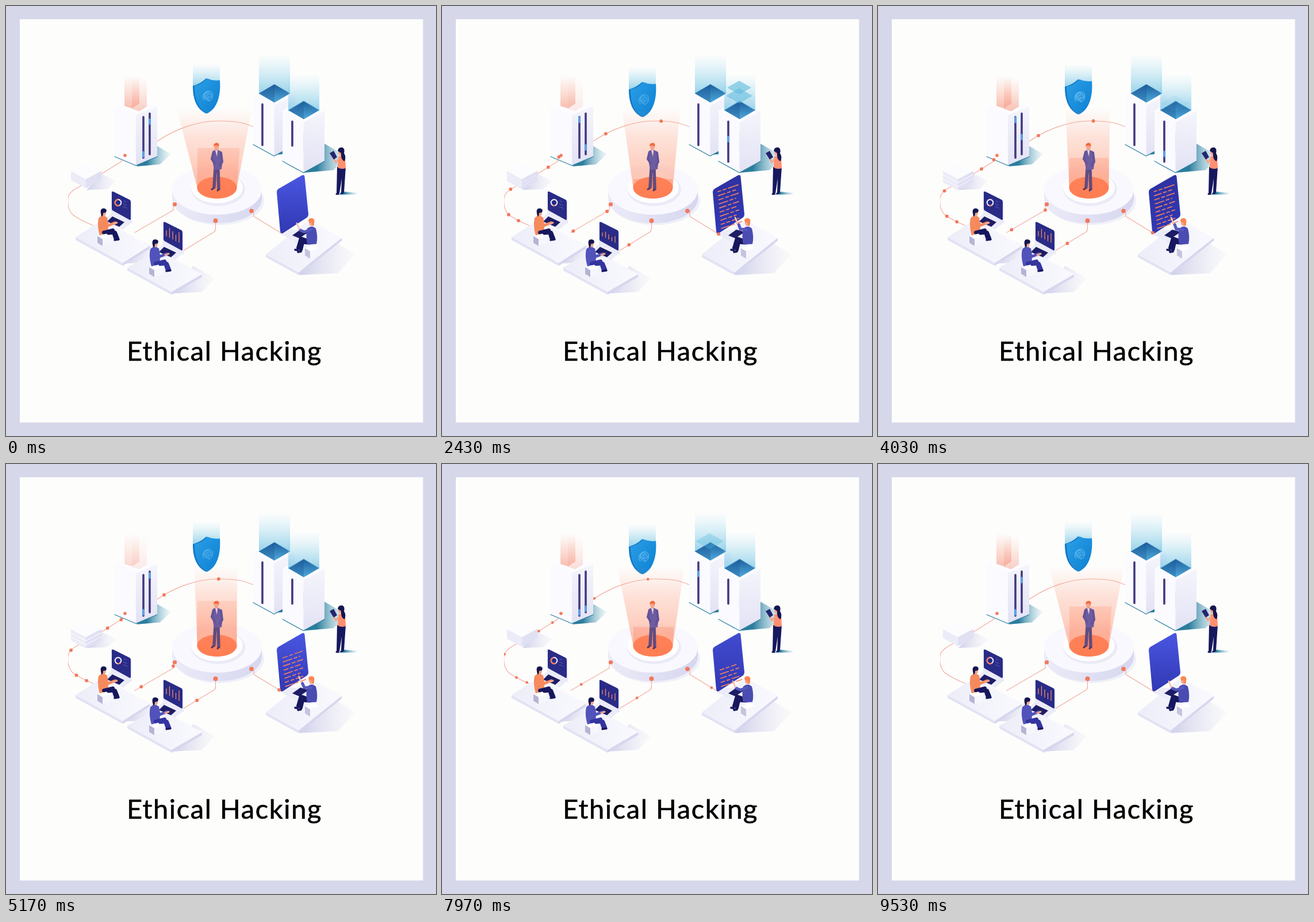
Recreate the animation shown at these times as an HTML page. Size 748 by 748 pixels, loop 9560 ms.

```html
<!DOCTYPE html>
<html lang="en">
<head>
<meta charset="utf-8">
<title>Ethical Hacking</title>
<style>
html, body { margin: 0; width: 100%; height: 100%; overflow: hidden; background: #d6d7e9; }
svg { display: block; width: 100%; height: 100%; }
.title { font: 400 47px Lato, "Open Sans", sans-serif; letter-spacing: 1.6px; stroke: #000; stroke-width: .6; stroke-linejoin: round; }
.limb { fill: none; stroke-linecap: round; stroke-linejoin: round; }
</style>
</head>
<body>
<svg viewBox="0 0 748 748">
  <defs>
    <linearGradient id="coneFill" gradientUnits="userSpaceOnUse" x1="0" y1="178" x2="0" y2="322">
      <stop offset="0" stop-color="#ff9d80" stop-opacity="0"/>
      <stop offset=".35" stop-color="#ff9474" stop-opacity=".26"/>
      <stop offset="1" stop-color="#ff8058" stop-opacity=".52"/>
    </linearGradient>
    <linearGradient id="salmon" x2="0" y2="1">
      <stop stop-color="#f9a08a" stop-opacity="0"/><stop offset="1" stop-color="#f58f74" stop-opacity=".6"/>
    </linearGradient>
    <linearGradient id="sky" x2="0" y2="1">
      <stop stop-color="#9fdcf0" stop-opacity="0"/><stop offset="1" stop-color="#6cc0e2" stop-opacity=".7"/>
    </linearGradient>
    <linearGradient id="shieldFill" x2="1" y2="1">
      <stop stop-color="#2a9fe6"/><stop offset="1" stop-color="#0d7fd2"/>
    </linearGradient>
    <linearGradient id="pit" x2="0" y2="1">
      <stop stop-color="#1c5f9e"/><stop offset="1" stop-color="#4fa9da"/>
    </linearGradient>
    <linearGradient id="side" x2="0" y2="1">
      <stop stop-color="#f5f5fc"/><stop offset="1" stop-color="#e2e2f4"/>
    </linearGradient>
    <linearGradient id="teal">
      <stop offset=".3" stop-color="#2b7d9c"/><stop offset="1" stop-color="#a9d4e2" stop-opacity=".15"/>
    </linearGradient>
    <linearGradient id="shade">
      <stop stop-color="#cfcfea"/><stop offset="1" stop-color="#e9e9f6" stop-opacity=".2"/>
    </linearGradient>
    <linearGradient id="rim">
      <stop stop-color="#ebebf8"/><stop offset="1" stop-color="#d6d6ef"/>
    </linearGradient>
    <linearGradient id="slab">
      <stop stop-color="#ededf9"/><stop offset="1" stop-color="#f9f9fe"/>
    </linearGradient>
    <linearGradient id="glass" x2="0" y2="1">
      <stop id="glassTop"/><stop offset="1" stop-color="#3138b2"/>
    </linearGradient>
    <clipPath id="stage"><rect x="108" y="80" width="506" height="430"/></clipPath>
  </defs>
  <rect width="748" height="748" fill="#d6d7e9"/>
  <rect x="24" y="23" width="701.5" height="701.5" fill="#fdfdfc"/>
  <g id="scene" clip-path="url(#stage)"></g>
  <text class="title" x="380" y="617" text-anchor="middle">Ethical Hacking</text>
</svg>
<script>
const LOOP = 9560, TAU = 2 * Math.PI;
const NAVY = '#17175e', HAIR = '#15154f', CORAL = '#f2785c', SKIN = '#f3a58c';
const $ = id => document.getElementById(id);
const clamp = v => Math.min(1, Math.max(0, v));
const ramp = (t, a, b) => clamp((t - a) / (b - a));
const ease = u => u * u * (3 - 2 * u);
// Rises from a to b, holds, falls from c to d.
const pulse = (t, a, b, c, d) => ease(ramp(t, a, b)) * (1 - ease(ramp(t, c, d)));
// Cosine with n whole turns per loop.
const wave = (t, n, shift = 0) => Math.cos(TAU * (n * t / LOOP - shift));
const times = (n, f) => Array.from({ length: n }, (_, i) => f(i));

const poly = (pts, fill, extra = '') => `<polygon points="${pts}" fill="${fill}" ${extra}/>`;
const path = (d, fill, extra = '') => `<path d="${d}" fill="${fill}" ${extra}/>`;
const limb = (d, color, w, extra = '') => `<path class="limb" d="${d}" stroke="${color}" stroke-width="${w}" ${extra}/>`;
const disc = (x, y, rx, fill, ry = rx) => `<ellipse cx="${x}" cy="${y}" rx="${rx}" ry="${ry}" fill="${fill}"/>`;
const group = (id, body) => `<g id="${id}">${body}</g>`;
const diamond = (x, y, w, h) => `${x - w},${y} ${x},${y - h} ${x + w},${y} ${x},${y + h}`;
const slot = (x, y, h, extra = '') => limb(`M${x} ${y}v${h}`, '#43397f', 3.6, extra);
const lamp = id => limb('', '#5aa7ea', 3.4, `id="${id}"`);

// Isometric box: left top corner, run to the front, run to the right, height, slopes.
function box(x, y, a, b, h, ka = .55, kb = ka, left = '#fafaff', right = 'url(#side)', top = '#fcfcff') {
  const p = a * ka, q = b * kb;
  return path(`M${x} ${y}l${a} ${p}v${h}l${-a} ${-p}z`, left) +
    path(`M${x + a} ${y + p}l${b} ${-q}v${h}l${-b} ${q}z`, right) +
    path(`M${x} ${y}l${a} ${p}l${b} ${-q}l${-a} ${-p}z`, top);
}
const foot = (x, y, a, k) => limb(`M${x} ${y}l${a} ${a * k}l${a} ${-a * k}`, '#2b7fa0', 1.2);
const slab = (x, y, a, b, kb) => box(x, y, a, b, 5, .55, kb, '#e2e2f4', '#d6d6ee', 'url(#slab)');
// Soft shadow that leans away to the right from a front corner.
const shadow = (x, y, w, h, fill = 'url(#shade)') => path(`M${x} ${y}l${w * .5} ${-h}l${w * .5} ${h * .45}l${-w * .3} ${h * .5}z`, fill);
const tealShadow = (x, y, w) => path(`M${x} ${y}l${w * .48} ${-w * .66}l${w * .52} ${w * .3}l${-w * .32} ${w * .3}z`, 'url(#teal)');

const tower = (x, y) => box(x, y, 36.5, 36.5, 88) + foot(x, y + 88, 36.5, .55) +
  poly(diamond(x + 37, y - 1, 27.5, 16), 'url(#pit)') +
  poly(`${x + 9.5},${y - 1} ${x + 37},${y - 17} ${x + 37},${y + 15}`, '#1c5a98', 'opacity=".35"');
const glow = (x, y, h) => path(`M${x} ${y}h54v${h}l-27 -16l-27 16z`, 'url(#sky)');
const sheet = (id, x, y) => path(`M${x} ${y}h26v50l-13 8l-13 -4z`, 'url(#salmon)', `id="${id}"`);

const head = (x, y, hair) => disc(x, y, 4, SKIN, 5.5) + path(`M${x - 5} ${y + 1}q-2 -9 5 -9q7 1 4 7l-5 1q0 6 -3 6z`, hair);

const standing = limb('M364 283L362 315M369 283L370 318', '#5f4c82', 5.5) + limb('M361 317l-3 2M370 319l-2 2', '#4a3767', 3) +
  path('M360 252Q367 248 374 253Q378 263 375 284L362 285Q358 266 360 252Z', '#6d5c9f') +
  limb('M361 254L358 266L363 274M374 255L376 271L372 278', '#62529a', 4) +
  path('M364 251l4 0l-1 11z', '#f4d4d6') + disc(366, 245, 4, SKIN, 5.5) + path('M361 244q0 -6 6 -6q5 1 3 7q-3 -4 -9 -1z', '#f5683c');

const woman = path('M578 328l10 -5l24 2l-4 3z', 'url(#teal)') +
  path('M576 280H591L588 324H583L584 300L580 326H575Z', NAVY) + limb('M578 327l-3 0M586 325l-3 1', NAVY, 3) +
  path('M578 262Q584 259 590 263L591 282Q584 285 577 281Z', '#ff8f70') +
  limb('M579 266L574 272L570 265', SKIN, 3) + path('M563 256l7 -4l6 11l-6 4z', '#25256e') +
  disc(582, 255, 4, SKIN, 5) + path('M577 252Q578 245 585 246Q590 248 588 256Q592 262 589 270Q582 268 583 256Z', HAIR);

// Worker at a laptop, relative to the left corner of the seat.
const worker = (x, y, shirt, legs) => `<g transform="translate(${x} ${y})">` +
  box(0, 0, 9, 15, 12, .6, .35, '#b4b4d4', '#f6f6fd', '#fff') +
  path('M2 -31q7 -8 15 -1q3 11 1 27l-14 4q-5 -17 -2 -30z', shirt) +
  limb('M11 -6L27 -10L31 3M19 -5L31 -6L35 4', legs, 6) + limb('M30 7l7 -1', NAVY, 3.5) +
  limb('M13 -30L18 -18L31 -23', shirt, 5) + limb('M28 -21l6 -2', SKIN, 3) + head(11, -40, HAIR) + '</g>';

const laptop = (x, y) => path(`M${x - 15} ${y + 51}l16 -15l34 17l-15 13z`, '#ececf9') +
  path(`M${x - 8} ${y + 52}l9 -9l21 10l-9 8z`, '#1d1d66') +
  path(`M${x - 1} ${y + 1}q0 -3 3 -2l30 15q3 2 3 5v37l-36 -18z`, '#eaeaf8') +
  path(`M${x} ${y + 1}q0 -2 3 -1l28 14q2 1 2 4v29q0 3 -2 2l-29 -16q-2 -1 -2 -3z`, '#292b86');

const coder = box(520, 421, 9, 16, 13, .6, .35, '#c4c4de', '#f6f6fd', '#fff') +
  limb('M532 411L513 404L508 421M528 412L516 411L513 424', NAVY, 6) + limb('M508 425l-5 -1M513 427l-5 1', NAVY, 3.5) +
  path('M524 387Q532 380 539 387Q543 402 540 414L524 415Q521 400 524 387Z', '#4a4cb2') +
  limb('', '#5658bd', 5, 'id="sleeve"') + limb('', '#f7c3ae', 2.6, 'id="hand"') +
  `<g transform="matrix(-1 0 0 1 1062 0)">${head(531, 377, '#fb8752')}</g>`;

const ROWS = 10, BARS = 5;
const codeRow = i => {
  const x = 477 + i * .7, y = 324 + i * 7.1, a = 8 + i * 7 % 11, b = 38 - i * 5 % 9;
  const seg = (u, v) => `M${x + u} ${y - u * .34}L${x + v} ${y - v * .34}`;
  return limb(seg(3, a) + seg(a + 4, a + 9) + seg(a + 13, b), '#f47f61', 1.7);
};
const prints = times(4, i => {
  const r = 2.2 + 2.4 * i;
  return `<ellipse cx="351" cy="157" rx="${r * .85}" ry="${r}" stroke-dasharray="${r * 3.6} ${r * .8}" transform="rotate(${20 + i * 65} 351 157)"/>`;
});

// Wires carry dots: speed in px/s, place of the first dot at t = 0, gap, count.
const wires = [
  { d: 'M430 210C415 204 405 200 370 200S295 213 262 236', v: 4.15, from: 40, gap: 100, n: 2 },
  { d: 'M207 260L201.5 264V270L163 294', v: 3.5, from: -4, gap: 28, n: 2 },
  { d: 'M132 312C105 324 107 334 108 345', v: 3, from: 7, gap: 0, n: 1 },
  { d: 'M108 345C109 354 112 359 116 363Q128 372 152 382', v: 2.9, from: 13, gap: 20, n: 2 },
  { d: 'M224 394L291 355V343', v: 2.9, from: -2, gap: 68, n: 2 },
  { d: 'M298 432L362 393Q364.500 391 364.500 387V373', v: 2.9, from: 25, gap: 0, n: 1 },
  { d: 'M490 402L431 366V358L427 356', v: 2.6, from: 4, gap: 0, n: 1 }
];
const joint = (x, y, r) => disc(x, y, r, CORAL);

$('scene').innerHTML =
  tealShadow(227, 279, 60) + tealShadow(467, 259, 70) + tealShadow(518, 290, 76) +
  shadow(140, 320, 52, 28) + shadow(203, 448, 70, 38) + shadow(289, 500, 74, 48) + shadow(510, 468, 97, 66) +
  disc(371, 339, 78, '#f0f0f9', 42) + disc(367, 335, 78, 'url(#rim)', 43) +
  path('M289 320h156v15h-156z', 'url(#rim)') + disc(367, 320, 78, '#f8f8fe', 43) +
  disc(369, 319, 47, '#ebebf7', 29) + disc(367, 316, 45, '#fefeff', 27) + disc(367, 316, 34.5, '#ff7a4d', 19) +
  limb(wires.map(w => w.d).join(''), '#f3a99b', 1.1) +
  box(189, 174, 37, 37, 88, .42) + foot(189, 262, 37, .42) + slot(239, 193, 71) + slot(250, 187, 71) + lamp('lampA') + lamp('lampB') +
  sheet('sheetA', 206, 120) + sheet('sheetB', 219, 125) +
  tower(430, 153) + slot(446, 171, 71) + lamp('lampC') + group('tilesA', '<polygon/><polygon/>') + glow(440, 84, 68) +
  tower(481, 182) + slot(498, 201, 42, 'id="slotD"') + lamp('lampD') + group('tilesB', '<polygon/><polygon/>') + glow(491, 118, 64) +
  group('stack', times(3, () => `<g>${box(113, 287, 26, 27, 6, .54, .54, '#ececf8', '#e0e0f3')}</g>`).join('')) +
  path('M325 100H372V140H325Z', 'url(#sky)', 'id="beam"') +
  group('shield',
    path('M348 126Q339 135 325 139C325 161 331 179 348 187L354 184L352 128Z', '#1478c6') +
    path('M350 126Q361 131 372 129C374 152 369 178 350 187C334 179 328 162 328 139Q342 136 350 126Z', 'url(#shieldFill)') +
    `<g id="print" fill="none" stroke="#8fd3fa" stroke-width=".9">${prints.join('')}</g>`) +
  path('', 'url(#coneFill)', 'id="plane"') + path('', 'url(#coneFill)', 'id="cone"') + standing + woman +
  slab(121, 402, 82, 47, .64) + slab(211, 455, 77, 53, .58) + slab(452, 432, 57, 75, .8) +
  laptop(184, 323) + '<g fill="none" stroke-width="2.2"><circle cx="195" cy="342" r="5.3" stroke="#e8e4f6"/>' +
  '<circle id="donut" cx="195" cy="342" r="5.3" stroke="#f2785c"/></g>' +
  limb('M204 344l6 3M204 349l7 3M205 339l4 2', '#5558a8', 1.1) + worker(159, 400, '#f58a5d', NAVY) +
  laptop(274, 376) + group('bars', times(BARS, () => limb('', '#f58b6a', 1.3)).join('')) + worker(249, 454, '#5153ba', '#3434a0') +
  path('M478 397l17 -8l34 2l-23 21z', '#ececf9') +
  path('M471 324Q471 320 474 318L514 295Q519 292 519.500 297L526 362Q526 367 522 369L482 395Q478 397 477 392Z', 'url(#glass)') +
  group('rows', times(ROWS, codeRow).join('')) + path('M498 399l14 -10l15 4l-17 11z', '#1d1d66') + coder +
  joint(207, 260, 2.8) + joint(293.5, 345, 3.6) + joint(364.5, 373.5, 4) + joint(427, 356.5, 3.8) +
  group('dots', '');

const set = (el, attrs) => { for (const k in attrs) el.setAttribute(k, attrs[k]); };
const setLamp = (id, x, y, on = 1) => set($(id), { d: `M${x} ${y}v8`, opacity: on });
const make = name => document.createElementNS('http://www.w3.org/2000/svg', name);

const dots = wires.flatMap(w => {
  const line = make('path');
  line.setAttribute('d', w.d);
  return times(w.n, i => {
    const el = $('dots').appendChild(make('circle'));
    el.setAttribute('fill', CORAL);
    return { el, line, end: line.getTotalLength(), v: w.v, from: w.from + i * w.gap };
  });
});

// Two translucent tiles pop out of a tower and sink back in.
function drawTiles(id, x, y, t) {
  const lift = ease(ramp(t, 5250, 5800)) * (1 - ramp(t, 5800, 9000));
  times(2, i => {
    const h = (55 - 20 * i) * lift, w = 27 - h * .15;
    set($(id).children[i], {
      points: diamond(x, y - h, w, w * .57), fill: '#4fb3d9',
      opacity: .6 * pulse(t, 5250, 5500, 7500 - 600 * i, 8700 - 600 * i)
    });
  });
}

function draw(t) {
  const bob = 3.1 * (1 - wave(t, 2));
  set($('shield'), { transform: `translate(0 ${bob})` });
  set($('beam'), { transform: `translate(0 ${bob * .8})` });
  set($('print'), { opacity: .8 + .2 * wave(t, 3, .25) });

  const open = (1 + wave(t, 1)) / 2, l = 328 - 31 * open, r = 402 + 26 * open;
  set($('cone'), { d: `M${l} 178H${r}L401.500 316A34.500 19 0 0 1 332.500 316Z` });
  const rise = (t + LOOP - 2300) % (LOOP / 2) / 1000, y = 304 - 23 * rise;
  set($('plane'), {
    d: `M333 ${y}H${401 + .08 * open * (316 - y)}L401.500 316A34.500 19 0 0 1 332.500 316Z`,
    opacity: .8 * ramp(rise, 0, .1) * (1 - ramp(rise, 2.7, 3.8))
  });

  const size = 2.9 * pulse(t, 800, 1500, 7700, 8700);
  for (const { el, line, end, v, from } of dots) {
    const s = from + v * t / 1000, p = line.getPointAtLength(Math.min(end, Math.max(0, s)));
    set(el, { cx: p.x, cy: p.y, r: size * ramp(s, 0, 4) * ramp(end - s, 0, 4) });
  }

  set($('sheetA'), { opacity: .95 - .4 * pulse(t, 4200, 5150, 5200, 6500) });
  set($('sheetB'), { opacity: .6 - .35 * wave(t, 3, .69) });
  const run = pulse(t, 900, 1200, 4200, 4600);
  setLamp('lampA', 239, 254 - 60 * pulse(t, 800, 2300, 4000, 5100));
  setLamp('lampB', 250, 219 - 30 * wave(t, 2, .12));
  setLamp('lampC', 446, 172 + .011 * (t - 6600), pulse(t, 6000, 6300, 8300, 8700));
  setLamp('lampD', 498, 203 + .016 * (t - 900), run);
  set($('slotD'), { d: `M498 201v${42 + 28 * run}` });
  drawTiles('tilesA', 465.5, 152, t);
  drawTiles('tilesB', 517, 181, t + 4300);

  const gap = 6 - wave(t, 1);
  times(3, i => set($('stack').children[i], { transform: `translate(0 ${(2 - i) * gap})` }));

  const part = 19 - 15 * pulse(t, 300, 1600, 6800, 7970);
  set($('donut'), { 'stroke-dasharray': `${part} 40`, transform: `rotate(${60 + 10 * wave(t, 1, .25)} 195 342)` });
  times(BARS, i => {
    const h = (9 + i * 7 % 10) * (.8 + .2 * wave(t, 2));
    set($('bars').children[i], { d: `M${279 + i * 5.5} ${400 + i * 2.8}v${-h}` });
  });

  const shown = ROWS * (ramp(t, 300, 2200) - ramp(t, 4300, 6300) / 2 - ramp(t, 8000, 9200) / 2);
  times(ROWS, i => set($('rows').children[i], { opacity: clamp(shown - (ROWS - 1 - i)) }));
  const dim = pulse(t, 300, 1800, 4100, 5100) + .3 * pulse(t, 5200, 6500, 8000, 9300);
  set($('glassTop'), { 'stop-color': `rgb(${74 - 28 * dim},${86 - 36 * dim},${226 - 64 * dim})` });

  const up = pulse(t, 300, 1600, 4300, 7900), hx = 507 + 4 * up, hy = 386 - 10 * up;
  set($('sleeve'), { d: `M530 389L519 ${393 - 5 * up}L${hx + 5} ${hy + 4}` });
  set($('hand'), { d: `M${hx + 3} ${hy + 2}L${hx - 1} ${hy - 8}` });
}

function tick(now) {
  draw(now % LOOP);
  requestAnimationFrame(tick);
}
draw(0);
requestAnimationFrame(tick);
</script>
</body>
</html>
```
